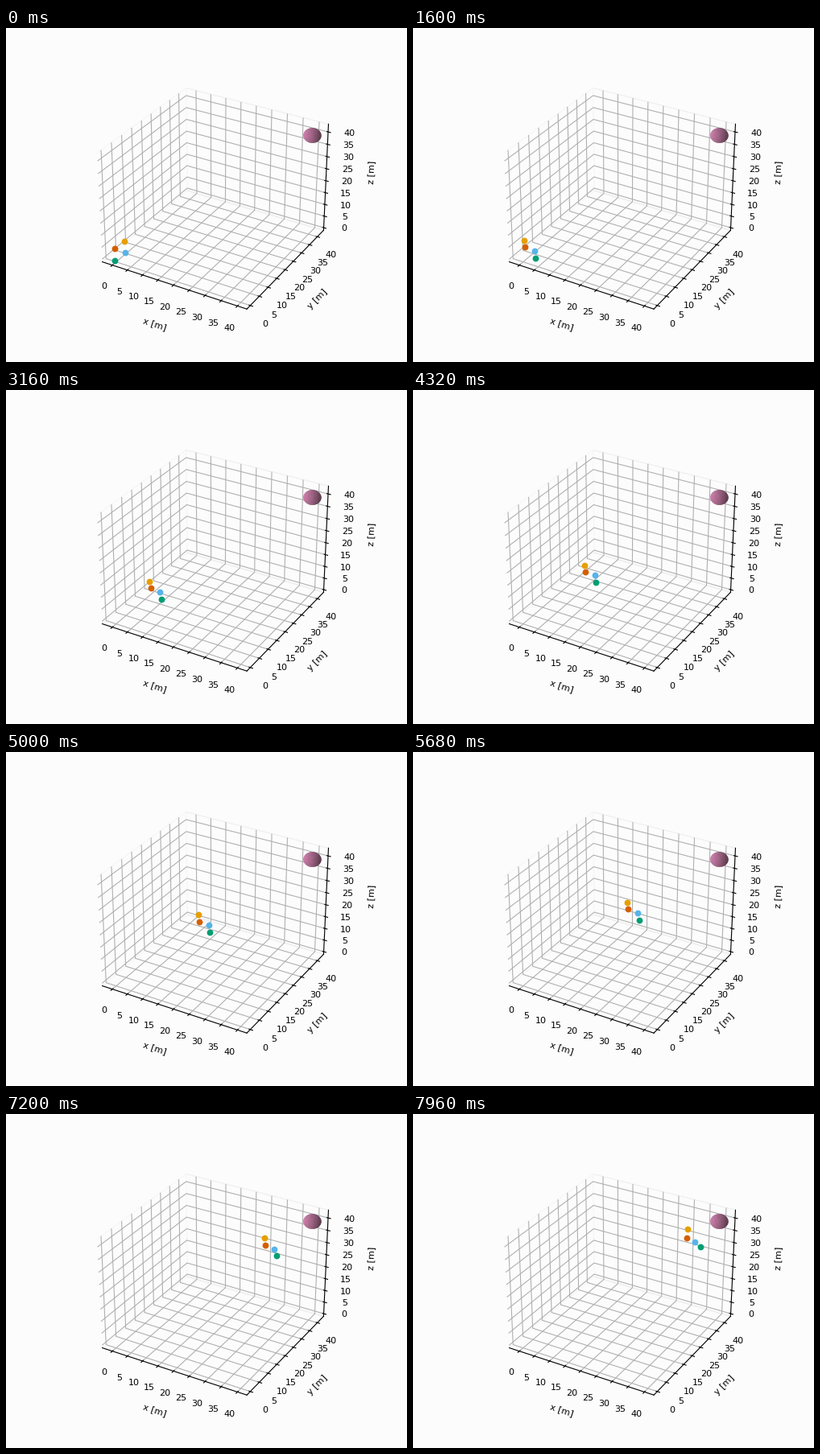
A matplotlib script for the animation above (8 s loop, 498x415 px).

```python
import numpy as np
import matplotlib.pyplot as plt
from matplotlib.animation import FuncAnimation
from matplotlib.lines import Line2D

WIDTH, HEIGHT, DPI = 498, 415, 100
FRAMES, INTERVAL = 200, 40

# Path of the swarm centre on screen: time (ms), x, y (pixels from the top left).
PATH = np.array([(200, 141.2, 276.6), (1040, 140, 278.2), (1600, 144.8, 274.4),
                 (3160, 185.5, 248.8), (4320, 220.2, 228.2), (5680, 273.4, 197.5),
                 (6480, 302.2, 180.5), (7720, 342.5, 157), (7960, 346.9, 154.8)])
TIMES, CENTRE = PATH[:, 0], PATH[:, 1:]
SLOPES = np.gradient(CENTRE, TIMES, axis=0)

# Offsets from the centre, one row per agent.
COLORS = ["#E69F00", "#56B4E9", "#009E73", "#D55E00"]
START = np.array([(5.8, -11.6), (6.8, 1.9), (-6.2, 12.4), (-6.2, -2.6)])
CRUISE = np.array([(-7.1, -10.7), (5.9, 2.2), (7.2, 11.1), (-6, -2.6)])
ARRIVAL = np.array([(-5.9, -12.2), (2.6, 3.8), (10.1, 9.8), (-6.9, -1.2)])


def ease(t, begin, end):
    s = np.clip((t - begin) / (end - begin), 0, 1)
    return s * s * (3 - 2 * s)


def centre_at(t):
    """Cubic Hermite position of the swarm centre."""
    t = np.clip(t, TIMES[0], TIMES[-1])
    i = min(np.searchsorted(TIMES, t, side="right") - 1, len(TIMES) - 2)
    h = TIMES[i + 1] - TIMES[i]
    s = (t - TIMES[i]) / h
    blend = s * s * (3 - 2 * s)
    return ((1 - blend) * CENTRE[i] + blend * CENTRE[i + 1]
            + s * (1 - s) * h * ((1 - s) * SLOPES[i] - s * SLOPES[i + 1]))


def positions(t):
    formation = (START + (CRUISE - START) * ease(t, 200, 1400)
                 + (ARRIVAL - CRUISE) * ease(t, 6900, 7960))
    return centre_at(t) + formation


plt.rcParams["font.size"] = 8
fig = plt.figure(figsize=(WIDTH / DPI, HEIGHT / DPI), dpi=DPI, facecolor="#fcfcfc")
ax = fig.add_subplot(projection="3d", facecolor="none")
ax.set(xlim=(-3.39, 42.86), ylim=(-1.9, 44.1), zlim=(-1.13, 43.14),
       xlabel="x [m]", ylabel="y [m]", zlabel="z [m]")
for axis in (ax.xaxis, ax.yaxis, ax.zaxis):
    axis.set_ticks(range(0, 41, 5))
    axis.pane.fill = False

# Goal sphere
u, v = np.mgrid[0:2 * np.pi:30j, 0:np.pi:30j]
radius = 2.5
ax.plot_surface(40 + radius * np.cos(u) * np.sin(v),
                40 + radius * np.sin(u) * np.sin(v),
                40 + radius * np.cos(v), color="#CC79A7")

agents = [fig.add_artist(Line2D([], [], marker="o", ls="", color=color,
                                ms=4.6, transform=None))
          for color in COLORS]


def update(frame):
    for dot, (x, y) in zip(agents, positions(frame * INTERVAL)):
        dot.set_data([x], [HEIGHT - y])
    return agents


anim = FuncAnimation(fig, update, frames=FRAMES, interval=INTERVAL,
                     repeat=True, repeat_delay=0, blit=False)
plt.show()
```
